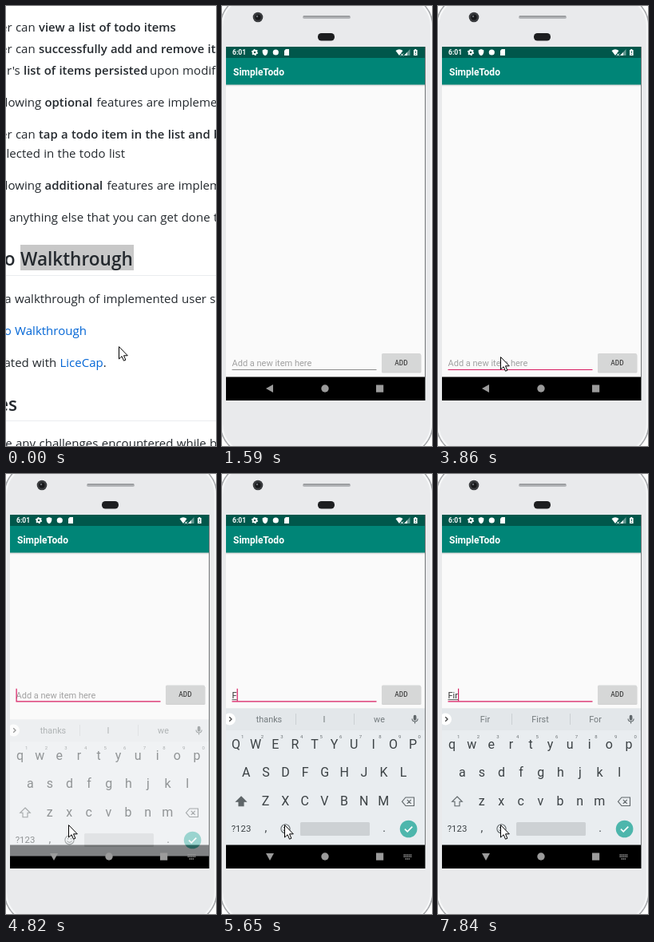
These frames come from a looping animation (263x551 px, 8000 ms). An HTML page:

```html
<!DOCTYPE html>
<html lang="en">
<head>
<meta charset="utf-8">
<title>Todo walkthrough</title>
<style>
html, body { margin: 0; width: 100%; height: 100%; overflow: hidden; background: #fff; }
svg { display: block; width: 100vw; height: 100vh; }
text { white-space: pre; }
#page text { font: 15.05px "Open Sans", "Noto Sans", sans-serif; word-spacing: .4px; fill: #24292e; }
#page .b { font-size: 14.9px; font-weight: 600; }
#page .a { fill: #0366d6; }
#page .h { font-size: 22.6px; font-weight: 600; }
#phone text { font-family: Roboto, "Noto Sans", sans-serif; }
.mid { text-anchor: middle; }
.end { text-anchor: end; }
</style>
</head>
<body>
<svg id="stage" viewBox="0 0 263 551" xmlns="http://www.w3.org/2000/svg">
  <defs>
    <clipPath id="screen"><rect x="5" y="51" width="249" height="443"/></clipPath>
    <linearGradient id="drop" x2="0" y2="1">
      <stop stop-color="#000" stop-opacity=".2"/><stop offset="1" stop-color="#000" stop-opacity="0"/>
    </linearGradient>
  </defs>

  <g id="page">
    <rect width="263" height="551" fill="#fff"/>
    <rect x="18" y="299" width="142" height="32" fill="#c8c8c8"/>
    <path d="M0 337.5H263M0 519.5H263" stroke="#eaecef"/>
  </g>

  <g id="phone">
    <rect width="263" height="551" fill="#fff"/>
    <rect x="-2" y="-14" width="266" height="577" rx="40" fill="#e9eaec" stroke="#a5a7aa" stroke-width="1.6"/>
    <rect x="0" y="-12" width="262" height="573" rx="38" fill="none" stroke="#f6f7f8" stroke-width="2"/>
    <circle cx="45" cy="14" r="6.3" fill="#3a3c3f"/>
    <circle cx="45" cy="14" r="3.6" fill="#17181a"/>
    <circle cx="44" cy="13" r="1.2" fill="#686c72"/>
    <rect x="101" y="12" width="60" height="4" rx="2" fill="#b4b6b9"/>
    <path d="M102 13H160" stroke="#85878a"/>
    <rect x="120" y="34" width="21" height="9.5" rx="4.5" fill="#1d1e20"/>

    <g clip-path="url(#screen)">
      <rect x="5" y="51" width="249" height="443" fill="#fafafa"/>
      <rect x="5" y="98" width="249" height="3" fill="url(#drop)"/>
      <rect x="5" y="51" width="249" height="14.5" fill="#00574b"/>
      <rect x="5" y="65" width="249" height="33.5" fill="#008577"/>
      <text x="13" y="61.3" font-size="8.6" font-weight="700" fill="#fff">6:01</text>
      <g fill="#fff">
        <circle cx="41" cy="58" r="2.2" fill="none" stroke="#fff" stroke-width="1.9"/>
        <circle cx="41" cy="58" r="3.5" fill="none" stroke="#fff" stroke-width="1.2" stroke-dasharray="1.8 1.87"/>
        <path d="M54 54L57.3 55.3V58Q57 61 54 62.3Q51 61 50.7 58V55.3Z"/>
        <circle cx="67.3" cy="58" r="3.6"/>
        <path d="M79.8 54H84V62H78V56Z"/>
        <path d="M217.5 56Q222 52.5 226.5 56L222 62Z"/>
        <path d="M235.5 54V62H228Z" opacity=".4"/>
        <path d="M232 58V62H228Z"/>
        <path d="M241.2 54H243.3V55H244.6V62H240V55H241.2Z"/>
      </g>
      <path d="M224 59.5L227 62.5M227 59.5L224 62.5" stroke="#fff"/>
      <path d="M242.3 56.4V59M242.3 60V61" stroke="#00574b"/>
      <text x="14" y="87" font-size="12" font-weight="700" fill="#fff">SimpleTodo</text>
      <rect x="5" y="464.5" width="249" height="30" fill="#000"/>

      <g id="row">
        <rect x="200" y="436.3" width="49.5" height="23.3" rx="1.5" fill="#000" opacity=".16"/>
        <rect x="200" y="435" width="49" height="23.3" rx="1.5" fill="#d6d7d7"/>
        <text class="mid" x="224.5" y="449.6" font-size="8.3" font-weight="500" fill="#444">ADD</text>
        <path id="line" d="M12.5 455.5H193.5"/>
        <text id="field" x="12.5" y="451.3" font-size="11"></text>
        <path id="compose" stroke="#444" stroke-width=".9"/>
        <path id="caret" stroke="#d81b60" stroke-width="1.2"/>
      </g>

      <g id="keys">
        <rect x="5" y="293.5" width="249" height="172" fill="#e9edf0"/>
        <rect x="5" y="293.5" width="249" height="27.5" fill="#e3e7ea"/>
        <rect x="5" y="464.5" width="249" height="40" fill="#000"/>
        <path d="M92.5 300V314M165.5 300V314" stroke="#cbd0d3"/>
        <circle cx="9.5" cy="307" r="7.5" fill="#fff"/>
        <path d="M9.2 304.2L12 307L9.2 309.8" fill="none" stroke="#444" stroke-width="1.3"/>
        <g fill="none" stroke="#5f6669" stroke-width="1.1">
          <rect x="240.3" y="302.4" width="2.6" height="5.6" rx="1.3" fill="#5f6669"/>
          <path d="M238 306.5Q238.3 310 241.6 310T245.2 306.5M241.6 310V312.5"/>
          <path id="shift" d="M24 404L30.3 410.3H27V415.8H21V410.3H17.7Z"/>
          <path d="M230 405H240.5V415.5H230L225.5 410.2ZM231.8 407.8L236.8 412.8M236.8 407.8L231.8 412.8"/>
          <circle cx="79.5" cy="444.3" r="5.6"/>
          <path d="M76.5 445.5Q79.5 449.3 82.5 445.5M77.6 442V443.4M81.4 442V443.4"/>
        </g>
        <rect x="98" y="436" width="87" height="17" rx="1.5" fill="#cdd1d4"/>
        <circle cx="233.6" cy="444.5" r="10.8" fill="#4db6ac"/>
        <path d="M229 444.7L232.2 447.9L238.3 441.6" fill="none" stroke="#fff" stroke-width="1.7"/>
      </g>

      <g fill="#9b9b9b">
        <path id="back" d="M55 479L64 474V484Z"/>
        <circle cx="129" cy="479" r="4.7"/>
        <rect x="193" y="474.5" width="9.2" height="9.2"/>
        <path id="ime" d="M227.5 477H237.5M227.5 479.3H237.5M229.5 482H235.5" stroke="#9b9b9b" stroke-width="1.4" stroke-dasharray="1.4 .7"/>
      </g>
    </g>
    <path d="M254.5 51V494" stroke="#55585a" stroke-width=".8"/>
  </g>

  <path id="mouse" d="M.5 .6V16L4.1 12.7L6.5 18.2L8.9 17.2L6.5 11.8H11.3Z" fill="#fff" stroke="#000"/>
</svg>
<script>
const LOOP = 8000;
const $ = id => document.getElementById(id);
const set = (el, attrs) => { for (const k in attrs) el.setAttribute(k, attrs[k]); };

function text(parent, x, y, str, attrs = {}) {
  const el = document.createElementNS('http://www.w3.org/2000/svg', 'text');
  set(el, { x, y, ...attrs });
  el.textContent = str;
  parent.appendChild(el);
  return el;
}

// Page copy: x, baseline, words, classes
[
  [41, 32, 'User can ', 'end'], [41, 32, 'view a list of todo items', 'b'],
  [41, 59, 'User can ', 'end'], [41, 59, 'successfully add and remove items', 'b'],
  [22, 86, "User's ", 'end'], [22, 86, 'list of items persisted', 'b'], [180, 86, 'upon modification'],
  [48.5, 126, 'The following ', 'end'], [48.5, 126, 'optional', 'b'], [113.5, 126, 'features are implemented:'],
  [41, 166, 'User can ', 'end'], [41, 166, 'tap a todo item in the list and bring', 'b'],
  [149, 190, 'selected in the todo list', 'end'],
  [48.5, 230, 'The following ', 'end'], [48.5, 230, 'additional', 'b'], [126.5, 230, 'features are implemented:'],
  [4, 270, 'anything else that you can get done to'],
  [11.5, 325, 'Video', 'h end'], [18, 325, 'Walkthrough', 'h'],
  [11, 372, "Here's a ", 'end'], [11, 372, 'walkthrough of implemented user stories:'],
  [101, 412, 'Video Walkthrough', 'a end'],
  [67.5, 452, 'GIF created with ', 'end'], [67.5, 452, 'LiceCap', 'a'], [121.8, 452, '.'],
  [14, 507, 'Notes', 'h end'],
  [12, 553, 'Describe ', 'end'], [12, 553, 'any challenges encountered while building']
].forEach(([x, y, str, cls = '']) => text($('page'), x, y, str, { class: cls }));

const keys = $('keys'), letters = [];
const label = (x, y, str, size, fill = '#3c4245') =>
  text(keys, x, y, str, { class: 'mid', 'font-size': size, fill });
[['qwertyuiop', 17.6, 344], ['asdfghjkl', 30.3, 379], ['zxcvbnm', 54.6, 415]].forEach(([row, x, y], r) =>
  [...row].forEach((c, i) => {
    const cx = x + 24.6 * i;
    letters.push(label(cx, y, c, 16));
    if (!r) label(cx + 8.2, 331, (i + 1) % 10, 6, '#6d7376');
  }));
label(24, 448, '?123', 11.4);
label(55, 448, ',', 14);
label(203, 448, '.', 14);
const hints = [59, 128, 197].map(x => label(x, 311, '', 10.8, '#737a7d'));

// Last entry whose start time has passed
const at = (t, steps) => steps.reduce((v, [start, value]) => t >= start ? value : v, null);

const mousePath = [
  [0, [141, 426]], [500, null], [2240, [144, 464]], [2390, [142, 464]],
  [2540, [121, 455]], [2660, [93, 445]], [2780, [78, 439]]
];
const typed = [[0, ''], [5650, 'F'], [7260, 'Fi'], [7840, 'Fir']];
const words = [
  [0, 'thanks I we'], [5920, 'F For From'], [7410, 'Fi First Find'], [7840, 'Fir First For']
];
const slide = [[0, [0, 0]], [4820, [14, .55]], [4940, [3, .95]], [5090, [0, 1]]];
const blinks = [3210, 3860, 4260, 5090, 5370, 6230, 6760];
const show = (el, on) => set(el, { visibility: on ? 'inherit' : 'hidden' });

function draw(t) {
  show($('page'), t < 1590);
  show($('phone'), t >= 1590);

  const pos = at(t, mousePath);
  show($('mouse'), pos);
  if (pos) set($('mouse'), { transform: `translate(${pos})` });

  const str = at(t, typed), field = $('field');
  field.textContent = str || 'Add a new item here';
  set(field, { fill: str ? '#333' : '#a0a0a0' });
  const end = 12.5 + (str ? field.getComputedTextLength() : 0);
  set($('compose'), { d: `M12.5 453.2H${end}` });
  show($('compose'), str);
  set($('caret'), { d: `M${end + .6} 439.3V455` });
  show($('caret'), blinks.filter(b => t >= b).length % 2);
  set($('line'), {
    stroke: at(t, [[0, '#808080'], [3210, '#b04d70'], [3330, '#d81b60']]),
    'stroke-width': t < 3210 ? .9 : 1.2
  });
  set($('row'), { transform: `translate(0 ${t < 4140 ? 0 : -170.6})` });

  const [dy, alpha] = at(t, slide);
  set(keys, { transform: `translate(0 ${dy})`, opacity: alpha });
  const caps = t >= 5090 && t < 5770;
  letters.forEach(l => {
    l.textContent = caps ? l.textContent.toUpperCase() : l.textContent.toLowerCase();
  });
  set($('shift'), { fill: caps ? '#5f6669' : 'none' });
  at(t, words).split(' ').forEach((w, i) => { hints[i].textContent = w; });

  set($('back'), { transform: `rotate(${at(t, [[0, 0], [4140, -45], [4260, -90]])} 60 479)` });
  show($('ime'), t >= 4260);
}

const begin = performance.now();
function tick() {
  draw((performance.now() - begin) % LOOP);
  requestAnimationFrame(tick);
}
tick();
</script>
</body>
</html>
```
